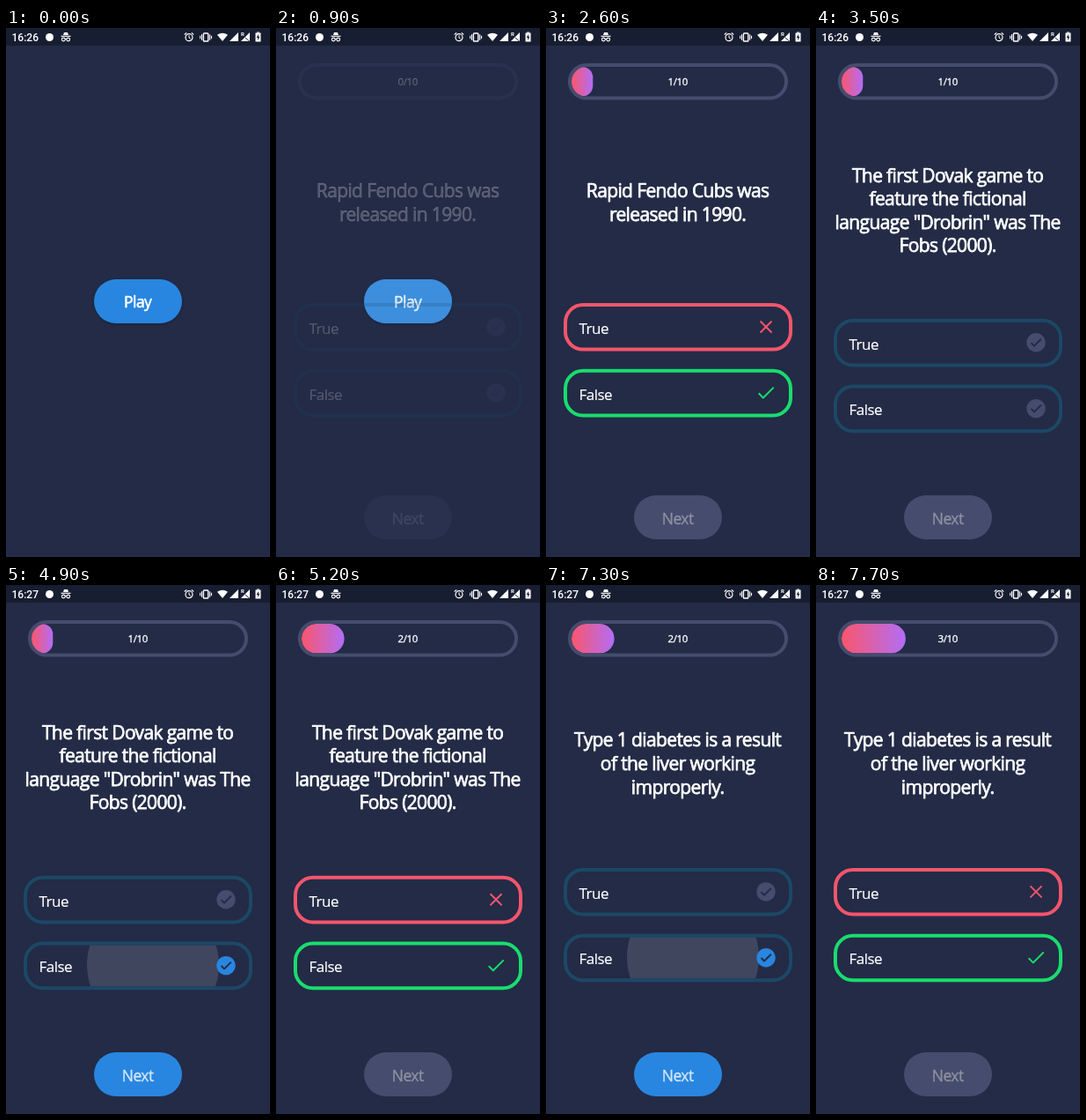
An HTML page with a canvas that plays this animation: 300x600 px, repeating every 8 s.

```html
<!DOCTYPE html>
<html lang="en">
<head>
<meta charset="utf-8">
<title>Quiz</title>
<style>
html, body { margin: 0; width: 100%; height: 100%; overflow: hidden; background: #232b46; }
canvas { display: block; width: 300px; height: 600px; }
</style>
</head>
<body>
<canvas id="stage"></canvas>
<script>
const LOOP = 8000, STEP = 100;
const BG = '#232b46', GREY = '#454c6e', BLUE = '#2886e0', TEAL = '#1c4867',
      RED = '#f4556c', GREEN = '#19dc6e', WHITE = '#fff';

const canvas = document.getElementById('stage');
const ctx = canvas.getContext('2d');
const dpr = window.devicePixelRatio || 1;
canvas.width = 300 * dpr;
canvas.height = 600 * dpr;

// start: question appears, tap: answer chosen, reveal: result shown
const rounds = [
  { start: 800, tap: 2100, reveal: 2500,
    lines: ['Rapid Fendo Cubs was', 'released in 1990.'] },
  { start: 3500, tap: 4900, reveal: 5100,
    lines: ['The first Dovak game to', 'feature the fictional', 'language "Drobrin" was The', 'Fobs (2000).'] },
  { start: 6100, tap: 7300, reveal: 7600,
    lines: ['Type 1 diabetes is a result', 'of the liver working', 'improperly.'] }
];

const clamp = v => Math.min(1, Math.max(0, v));

function pill(x, y, w, h, r) {
  ctx.beginPath();
  ctx.roundRect(x, y, w, h, r);
}

function disc(x, y, r, color) {
  ctx.beginPath();
  ctx.arc(x, y, r, 0, Math.PI * 2);
  ctx.fillStyle = color;
  ctx.fill();
}

function line(points, color, width) {
  ctx.beginPath();
  points.forEach(([x, y]) => ctx.lineTo(x, y));
  ctx.strokeStyle = color;
  ctx.lineWidth = width;
  ctx.stroke();
}

function shape(points, color) {
  ctx.beginPath();
  points.forEach(([x, y]) => ctx.lineTo(x, y));
  ctx.fillStyle = color;
  ctx.fill();
}

function ring(x, y, r, width) {
  ctx.beginPath();
  ctx.arc(x, y, r, 0, Math.PI * 2);
  ctx.strokeStyle = WHITE;
  ctx.lineWidth = width;
  ctx.stroke();
}

function label(str, x, y, size, { color = WHITE, align = 'center', bold = 0.35 } = {}) {
  ctx.font = `${size}px "Open Sans", "Noto Sans", sans-serif`;
  ctx.letterSpacing = `${-0.03 * size}px`;
  ctx.textAlign = align;
  ctx.lineJoin = 'round';
  ctx.fillStyle = ctx.strokeStyle = color;
  ctx.lineWidth = bold;
  ctx.fillText(str, x, y);
  ctx.strokeText(str, x, y);
}

function button(str, y, on, press = 0) {
  pill(100, y, 100, 50, 25);
  ctx.fillStyle = on ? BLUE : GREY;
  ctx.fill();
  if (press) {
    ctx.fillStyle = `rgba(255,255,255,${press})`;
    ctx.fill();
  }
}

function statusBar(t) {
  ctx.fillStyle = '#181e31';
  ctx.fillRect(0, 0, 300, 20);
  ctx.font = '500 12px Roboto, sans-serif';
  ctx.letterSpacing = '0px';
  ctx.textAlign = 'left';
  ctx.fillStyle = WHITE;
  ctx.fillText(t < 3800 ? '16:26' : '16:27', 6.5, 14.5);
  disc(49.5, 10.5, 4.5, WHITE);

  // hat and glasses
  shape([[65, 8], [66, 5], [70, 5], [71, 8]], WHITE);
  line([[62.5, 9.3], [73.5, 9.3]], WHITE, 1.2);
  ring(65.3, 13, 1.9, 1.1);
  ring(70.7, 13, 1.9, 1.1);
  line([[67, 12.5], [69, 12.5]], WHITE, 1);

  // alarm clock
  ring(208, 10.7, 4, 1.2);
  line([[208, 8.3], [208, 11], [209.8, 12.2]], WHITE, 1);
  line([[202.8, 7.5], [205.2, 5.4]], WHITE, 1.2);
  line([[213.2, 7.5], [210.8, 5.4]], WHITE, 1.2);

  // vibrate
  pill(224.4, 6, 5.4, 9, 0.8);
  ctx.strokeStyle = WHITE;
  ctx.lineWidth = 1.4;
  ctx.stroke();
  for (const side of [-1, 1]) {
    const x = 227.1 + side * 4.6, far = 227.1 + side * 6.4;
    line([[x, 7.2], [x, 13.8]], WHITE, 1.1);
    line([[far, 8.8], [far, 12.2]], WHITE, 1.1);
  }

  // wifi
  ctx.beginPath();
  ctx.moveTo(246, 15);
  ctx.lineTo(240, 7.8);
  ctx.quadraticCurveTo(246, 3.6, 252, 7.8);
  ctx.fillStyle = WHITE;
  ctx.fill();

  // signals
  shape([[254, 15], [264, 15], [264, 5]], WHITE);
  shape([[267, 15], [277, 15], [277, 5]], WHITE);
  line([[272, 11], [277, 15.5]], '#181e31', 1);
  ctx.font = '700 6px Roboto, sans-serif';
  ctx.fillStyle = WHITE;
  ctx.fillText('R', 267, 8.5);

  // battery
  ctx.fillStyle = WHITE;
  ctx.fillRect(283.5, 5.5, 6, 10);
  ctx.fillRect(285.2, 4.5, 2.6, 1.2);
  shape([[287, 7], [284.7, 11], [286.1, 11], [286, 14], [288.3, 10], [287, 10]], '#181e31');
}

function progressBar(count, value) {
  pill(27, 42, 246, 37.6, 18.8);
  ctx.strokeStyle = GREY;
  ctx.lineWidth = 4;
  ctx.stroke();
  if (value > 0) {
    const w = 24.3 * value;
    const grad = ctx.createLinearGradient(29, 0, 29 + w, 0);
    grad.addColorStop(0, '#fa566c');
    grad.addColorStop(1, '#b26df6');
    ctx.save();
    pill(29, 44, 242, 33.6, 16.8);
    ctx.clip();
    pill(29, 44, w, 33.6, Math.min(16.8, w / 2));
    ctx.fillStyle = grad;
    ctx.fill();
    ctx.restore();
  }
  label(`${count}/10`, 149.7, 65, 11.5);
}

function tick(x, y, color) {
  line([[x - 5.5, y + 0.3], [x - 2, y + 3.8], [x + 5.8, y - 4]], color, 2);
}

function option(str, y, { chosen, result, ripple }) {
  const border = result ? (str === 'True' ? RED : GREEN) : TEAL;
  if (ripple !== null) {
    ctx.save();
    pill(24, y - 23.5, 252, 47, 18);
    ctx.clip();
    disc(167, y - 1, 75 + 110 * ripple, `rgba(255,255,255,${0.13 * (1 - ripple)})`);
    ctx.restore();
  }
  pill(22, y - 25.3, 256, 50.6, 20);
  ctx.strokeStyle = border;
  ctx.lineWidth = 4;
  ctx.stroke();
  label(str, 37.5, y + 7.4, 17, { align: 'left', bold: 0.2 });

  const iy = y - 0.3;
  if (!result) {
    disc(250, iy, 10.7, chosen ? BLUE : GREY);
    tick(250, iy, BG);
  } else if (str === 'True') {
    line([[243.5, iy - 6.5], [256.5, iy + 6.5]], RED, 2);
    line([[243.5, iy + 6.5], [256.5, iy - 6.5]], RED, 2);
  } else {
    line([[241.7, iy + 0.5], [246.8, iy + 5.7], [258.7, iy - 6.2]], GREEN, 2);
  }
}

function question(round, index, t) {
  const n = round.lines.length;
  const result = t >= round.reveal;
  const chosen = t >= round.tap && !result;
  const spread = (t - round.tap) / 200;
  const ripple = chosen && spread < 1 ? spread : null;
  const grow = result ? clamp((t - round.reveal + STEP) / (2 * STEP)) : 0;

  progressBar(index + (result ? 1 : 0), index + grow);

  const mid = 198 + 4.5 * (n - 2);
  round.lines.forEach((str, i) => {
    label(str, 149.6, mid + (i - (n - 1) / 2) * 26.6 + 7.5, 21, { bold: 0.75 });
  });

  const y = 339.3 + 8.9 * (n - 2);
  option('True', y, { chosen: false, result, ripple: null });
  option('False', y + 74.8, { chosen, result, ripple });

  button('Next', 530, chosen);
  label('Next', 149.7, 562.5, 17.5, { color: chosen ? '#d3e5f8' : '#8c909f' });
}

function startScreen(press) {
  ctx.save();
  ctx.shadowColor = 'rgba(0,0,0,0.25)';
  ctx.shadowBlur = 3 * dpr;
  ctx.shadowOffsetY = dpr;
  button('Play', 285, true);
  ctx.restore();
  if (press) button('Play', 285, true, press);
  label('Play', 149.7, 317.4, 17.5, { bold: 0.6 });
}

function draw(t) {
  ctx.setTransform(dpr, 0, 0, dpr, 0, 0);
  ctx.globalAlpha = 1;
  ctx.fillStyle = BG;
  ctx.fillRect(0, 0, 300, 600);
  statusBar(t);

  const fade = clamp((t - 800) / 500);
  if (fade < 1) {
    ctx.globalAlpha = 1 - fade;
    startScreen(t >= 800 ? 0.12 : 0);
  }
  if (fade > 0) {
    ctx.globalAlpha = fade;
    const index = rounds.findLastIndex(r => t >= r.start);
    question(rounds[index], index, t);
  }
}

// the picture ticks ten times a second
const begin = performance.now();
function frame() {
  const t = (performance.now() - begin) % LOOP;
  draw(Math.floor(t / STEP) * STEP);
  requestAnimationFrame(frame);
}
frame();
</script>
</body>
</html>
```
